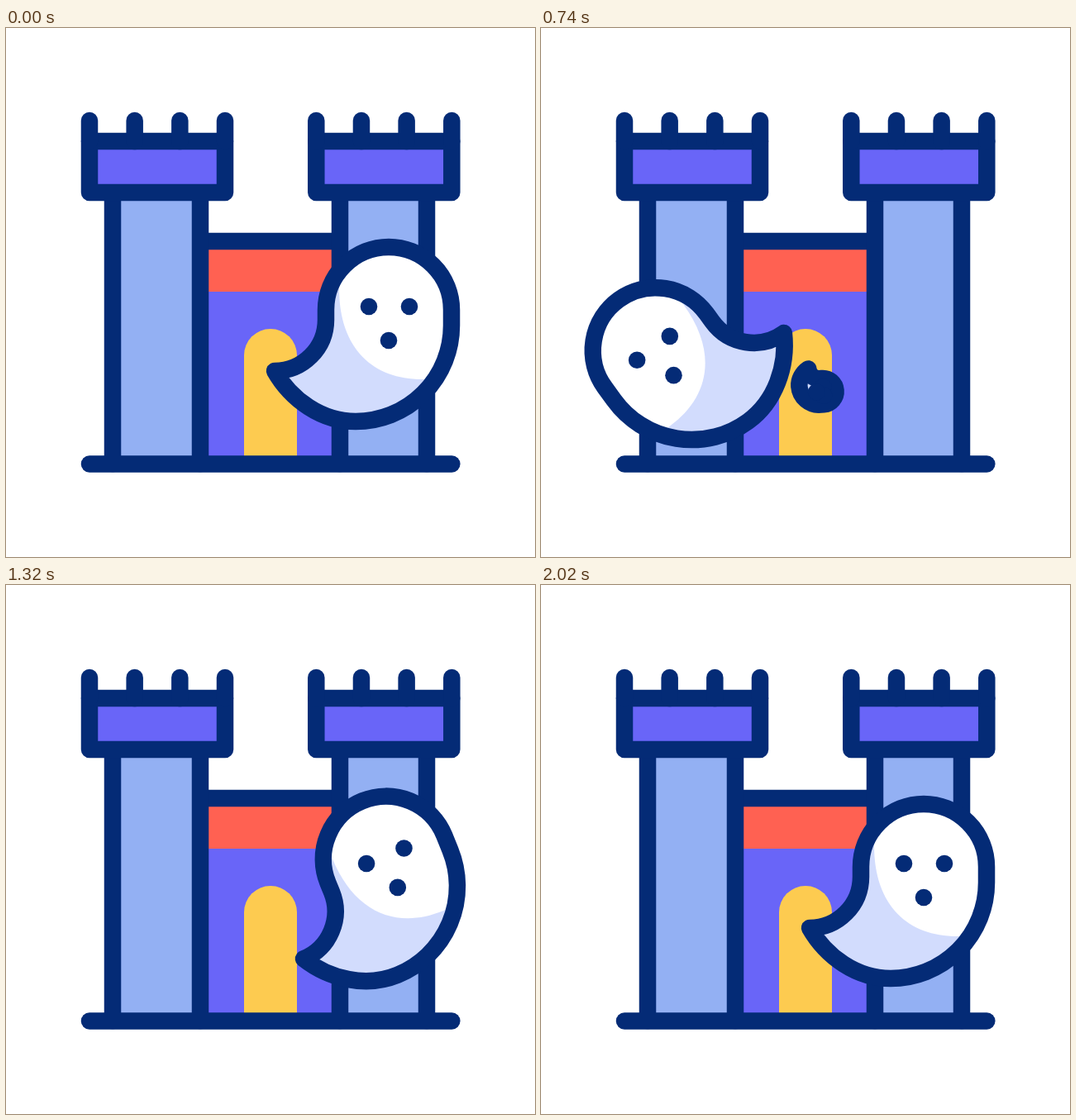
An HTML page with a canvas for the animation above (2.4 s loop, 640 px wide and 640 px high).

```html
<!DOCTYPE html>
<html lang="en">
<head>
<meta charset="utf-8">
<title>Ghosts at the castle</title>
<style>
html, body { margin: 0; width: 100%; height: 100%; overflow: hidden; background: #fff; }
canvas { display: block; width: 100%; height: 100%; }
</style>
</head>
<body>
<canvas id="stage" width="640" height="640"></canvas>
<script>
const ctx = document.getElementById('stage').getContext('2d');
const LOOP = 2400, STEP = 20;
const NAVY = '#042b76', BLUE = '#93b0f3', PURPLE = '#6965f8',
      RED = '#ff6152', YELLOW = '#fdcb50', SHADE = '#d2dcfd';

// Ghost outline, relative to the centre of its head
const body = new Path2D('M-76 0A76 76 0 0 1 76 0V19A116 116 0 0 1 -40 135C-81 135 -118 109 -138 74A62 62 0 0 0 -76 12Z');
const lit = new Path2D('M-60 -110V-26C-60 48 -18 84 40 84H140V-110Z');
const face = [[-24, -4], [25, -4], [0, 37]];

const speedUp = u => u ** 1.6;
const glide = u => u ** 0.8;
const slowDown = u => 1 - (1 - u) ** 1.6;

// Each flight is one cubic Bezier; its points hold x, y and angle
const ghosts = [
  { from: 0, to: 560, ease: speedUp, flip: 1, born: 1, grow: 0,
    path: [[463, 341, 0], [620, 210, -38], [358, -129, -67], [340, -190, -85]] },
  { from: 266, to: 1466, ease: glide, flip: -1, born: 0.12, grow: 2.3,
    path: [[300, 367, -88], [270, 750, -77], [-160, 235, -6], [432, -377, 84]] },
  { from: 720, to: 1920, ease: glide, flip: 1, born: 0.12, grow: 2.3,
    path: [[330, 393, 82], [424, 846, 122], [578, 172, -141], [309, -186, -38]] },
  { from: 1640, to: 2020, ease: slowDown, flip: 1, born: 0.12, grow: 0.88,
    path: [[330, 430, 85], [412, 607, 64], [445, 434, 38], [463, 341, 0]] }
];

function bezier([a, b, c, d], u) {
  const v = 1 - u;
  return a.map((p, i) =>
    p * v ** 3 + 3 * b[i] * v * v * u + 3 * c[i] * v * u * u + d[i] * u ** 3);
}

function line(...pts) {
  ctx.beginPath();
  for (let i = 0; i < pts.length; i += 2) ctx.lineTo(pts[i], pts[i + 1]);
  ctx.stroke();
}

function box(color, x, y, w, h) {
  ctx.fillStyle = color;
  ctx.fillRect(x, y, w, h);
}

function tower(x, left, right) {
  box(BLUE, left, 199, right - left, 328);
  line(left, 199, left, 527);
  line(right, 199, right, 527);
  box(PURPLE, x, 137, 164, 62);
  ctx.strokeRect(x, 137, 164, 62);
  for (let i = 0; i < 4; i++) {
    const mx = x + i * 164 / 3;
    line(mx, 112, mx, 137);
  }
}

function castle() {
  box(PURPLE, 235, 258, 169, 269);
  box(RED, 235, 258, 169, 61);
  ctx.fillStyle = YELLOW;
  ctx.beginPath();
  ctx.arc(320, 396, 32, Math.PI, 0);
  ctx.lineTo(352, 527);
  ctx.lineTo(288, 527);
  ctx.fill();
  line(235, 258, 404, 258);
  tower(101, 129, 235);
  tower(375.3, 404, 509);
  line(101, 527.5, 539.3, 527.5);
}

function ghost({ from, to, ease, flip, born, grow, path }, t) {
  if (t < from) return;
  const u = ease(Math.min(1, (t - from) / (to - from)));
  const [x, y, angle] = bezier(path, u);
  const size = Math.min(1, born + grow * u);
  const m = new DOMMatrix().translate(x, y).rotate(angle).scale(flip * size, size);
  const place = part => {
    const p = new Path2D();
    p.addPath(part, m);
    return p;
  };
  const shape = place(body);
  ctx.fillStyle = SHADE;
  ctx.fill(shape);
  ctx.save();
  ctx.clip(shape);
  ctx.fillStyle = '#fff';
  ctx.fill(place(lit));
  ctx.restore();
  ctx.stroke(shape);
  // Line weight and eye size stay the same at every scale
  ctx.fillStyle = NAVY;
  for (const [px, py] of face) {
    const p = m.transformPoint({ x: px, y: py });
    ctx.beginPath();
    ctx.arc(p.x, p.y, 10.3, 0, 2 * Math.PI);
    ctx.fill();
  }
}

function draw(t) {
  box('#fff', 0, 0, 640, 640);
  ctx.strokeStyle = NAVY;
  ctx.lineWidth = 20.5;
  ctx.lineCap = ctx.lineJoin = 'round';
  castle();
  for (const g of ghosts) ghost(g, t);
}

const start = performance.now();
function tick() {
  const t = (performance.now() - start) % LOOP;
  draw(Math.floor(t / STEP) * STEP);
  requestAnimationFrame(tick);
}
tick();
</script>
</body>
</html>
```
